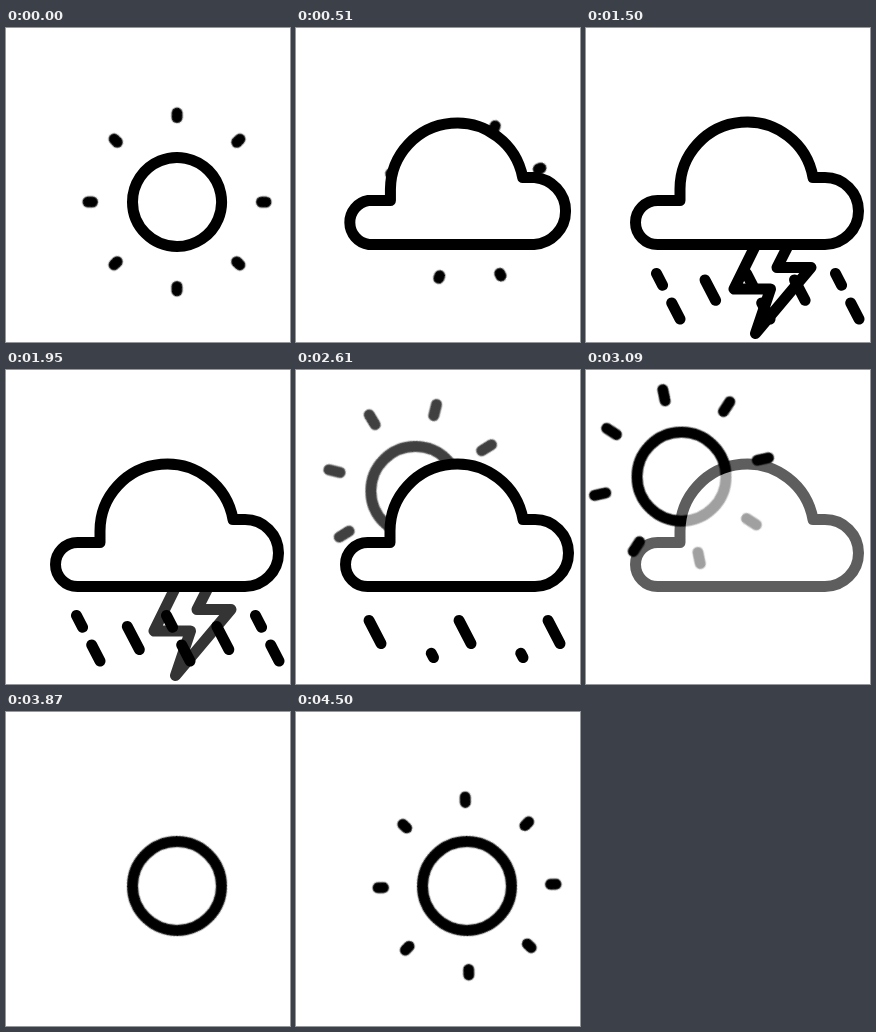
Recreate the animation shown at these times as an HTML page without scripts. Size 284 by 314 pixels, loop 4.53 s.

```html
<!DOCTYPE html>
<html lang="en">
<head>
<meta charset="utf-8">
<title>Weather icon</title>
<style>
  html, body { margin: 0; width: 100%; height: 100%; overflow: hidden; background: #fff; }
  svg { display: block; width: 100%; height: 100%; }
  .ink { fill: none; stroke: #000; stroke-width: 11; stroke-linecap: round; stroke-linejoin: round; }
  .ink * { animation: 4.53s linear infinite; }

  /* sun */
  .sun { animation-name: travel, glow; }
  .smear { animation-name: smear; animation-timing-function: step-end; }
  .spin { animation-name: spin; }
  .ring { animation-name: ring; animation-timing-function: step-end; }
  .rays { animation-name: trim, rays; animation-timing-function: linear, step-end; }

  @keyframes travel {
    0%, 51.66% { transform: translate(171px, 174px); animation-timing-function: cubic-bezier(.3, .5, .6, .9); }
    57.62% { transform: translate(119.5px, 121px); animation-timing-function: cubic-bezier(.16, .8, .3, 1); }
    75.9% { transform: translate(94.5px, 106px); }
    77.48% { transform: translate(117.5px, 125.5px); animation-timing-function: cubic-bezier(.2, .6, .3, 1); }
    82.8%, 100% { transform: translate(171px, 174px); }
  }
  @keyframes glow {
    0%, 13.2% { opacity: 1; }
    13.21%, 51.66% { opacity: 0; }
    57.62% { opacity: .75; }
    60%, 100% { opacity: 1; }
  }
  @keyframes smear {
    0% { filter: none; }
    75.9% { filter: url(#smear); }
    82.4%, 100% { filter: none; }
  }
  @keyframes spin { to { transform: rotate(180deg); } }
  @keyframes ring {
    0% { opacity: 0; }
    51.6%, 100% { opacity: 1; }
  }
  @keyframes rays {
    0% { opacity: 1; }
    13.2% { opacity: 0; }
    51.6% { opacity: 1; }
    85.35% { opacity: 0; }
    89.35%, 100% { opacity: 1; }
  }
  @keyframes trim {
    0%, 100% { stroke-dasharray: 4.5 99; stroke-dashoffset: -7; }
    13.2% { stroke-dasharray: 2.5 99; stroke-dashoffset: 0; }
    51.6%, 82.1% { stroke-dasharray: 11.5 99; stroke-dashoffset: 0; }
    85.4%, 89.35% { stroke-dasharray: 1 99; stroke-dashoffset: 0; }
    94.9% { stroke-dasharray: 11.5 99; stroke-dashoffset: 0; }
  }

  /* lightning */
  .bolt { animation-name: strike, dim; }
  @keyframes strike {
    0%, 18.54% { transform: translate(-62px, -97px); animation-timing-function: ease-in-out; }
    27.81%, 100% { transform: none; }
  }
  @keyframes dim {
    0%, 18.5% { opacity: 0; }
    18.54%, 41.06% { opacity: 1; }
    51%, 100% { opacity: 0; }
  }

  /* rain: a finite train of dashes runs down each line */
  .rain { --d: 26 20; --q: var(--d) var(--d) var(--d) var(--d) var(--d); }
  .long { stroke-dasharray: var(--q) var(--q) var(--d) 26 999; animation-name: long; }
  .short { stroke-dasharray: var(--q) var(--q) 26 999; animation-name: short; }
  @keyframes long {
    0%, 18.8% { stroke-dashoffset: 534px; }
    18.94% { stroke-dashoffset: 532px; }
    61.41%, 100% { stroke-dashoffset: -58px; }
  }
  @keyframes short {
    0%, 22.06% { stroke-dashoffset: 488px; }
    22.19% { stroke-dashoffset: 486px; }
    58.3%, 100% { stroke-dashoffset: -45px; }
  }

  /* cloud */
  .cloud { fill: #fff; animation-name: morph, clear; }
  @keyframes morph {
    0%, .4% {
      d: path("M171 218.5L171 218.5A44.5 44.5 0 0 0 202.5 142.5L202.5 142.5A44.5 44.5 0 0 0 126.5 174L126.5 174L126.5 174A44.5 44.5 0 0 0 171 218.5Z");
      animation-timing-function: cubic-bezier(.4, 0, .2, 1);
    }
    13.2%, 100% {
      d: path("M71.5 216.5L239 216.5A33.5 33.5 0 0 0 239 149.5L227 149.5A67 67 0 0 0 94 161L94 172.5L71.5 172.5A22 22 0 0 0 71.5 216.5Z");
    }
  }
  @keyframes clear {
    0%, 64.24% { opacity: 1; }
    75.06%, 99.99% { opacity: 0; }
    100% { opacity: 1; }
  }
</style>
</head>
<body>
<svg viewBox="0 0 284 314">
  <defs>
    <filter id="smear" filterUnits="userSpaceOnUse" x="-150" y="-150" width="300" height="300" color-interpolation-filters="sRGB">
      <feGaussianBlur stdDeviation="0 0">
        <animate attributeName="stdDeviation" dur="4.53s" repeatCount="indefinite"
          values="0 0;0 0;4 0;0 0;0 0" keyTimes="0;.757;.775;.822;1"/>
      </feGaussianBlur>
    </filter>
    <clipPath id="below"><rect y="216" width="284" height="98"/></clipPath>
    <path id="ray" d="M0-77.5V-89"/>
    <path id="drop" d="M70.5 245.5l23.5 45.5"/>
    <path id="drip" d="M119 252l18.5 35.5"/>
  </defs>

  <g class="ink">
    <g class="sun">
      <g transform="rotate(42)">
        <g class="smear">
          <g transform="rotate(-42)">
            <circle class="ring" r="44.5"/>
            <g class="spin">
              <g class="rays">
                <use href="#ray"/>
                <use href="#ray" transform="rotate(45)"/>
                <use href="#ray" transform="rotate(90)"/>
                <use href="#ray" transform="rotate(135)"/>
                <use href="#ray" transform="rotate(180)"/>
                <use href="#ray" transform="rotate(225)"/>
                <use href="#ray" transform="rotate(270)"/>
                <use href="#ray" transform="rotate(315)"/>
              </g>
            </g>
          </g>
        </g>
      </g>
    </g>

    <g clip-path="url(#below)">
      <path class="bolt" d="M180 196L148 261H184.500L169.500 305.500L225 239.500H191L213 196Z"/>
    </g>

    <g class="rain">
      <g class="long">
        <use href="#drop"/>
        <use href="#drop" x="90"/>
        <use href="#drop" x="179"/>
      </g>
      <g class="short">
        <use href="#drip"/>
        <use href="#drip" x="89.5"/>
      </g>
    </g>

    <path class="cloud" d="M71.5 216.5L239 216.5A33.5 33.5 0 0 0 239 149.5L227 149.5A67 67 0 0 0 94 161L94 172.5L71.5 172.5A22 22 0 0 0 71.5 216.5Z"/>
  </g>
</svg>
</body>
</html>
```
